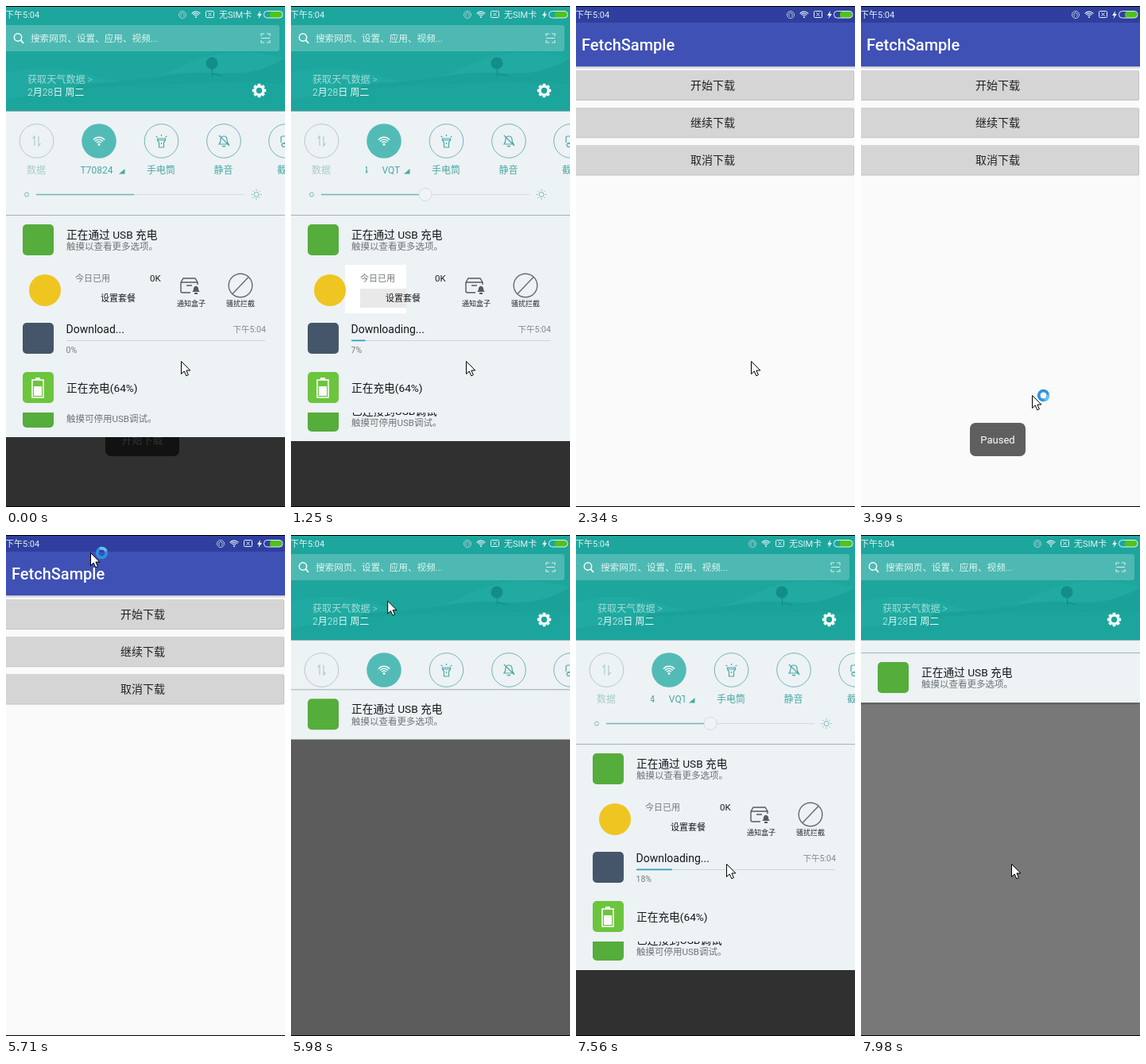
Recreate the animation shown at these times as an HTML page with a canvas. Size 351 by 631 pixels, loop 8 s.

```html
<!DOCTYPE html>
<html lang="zh-CN">
<head>
<meta charset="utf-8">
<title>Download notification</title>
<style>
html, body { margin: 0; width: 100%; height: 100%; overflow: hidden; background: #000; }
canvas { display: block; width: 351px; height: 631px; }
</style>
</head>
<body>
<canvas id="stage"></canvas>
<script>
const W = 351, H = 631, LOOP = 8000, ROW = 62, HEAD = 132, LIST = 264;
const FONT = 'Roboto, "Noto Sans CJK SC", "Noto Sans CJK", sans-serif';
const TEAL = '#4aa9a4', PANEL = '#edf2f5';
const canvas = document.getElementById('stage');
const c = canvas.getContext('2d');
const dpr = window.devicePixelRatio || 1;
canvas.width = W * dpr;
canvas.height = H * dpr;

// Screen refreshes: [first, last, count]
const ticks = [0];
for (const [a, b, n] of [[120, 1130, 8], [1250, 1400, 2], [1530, 1920, 4], [2070, 2200, 2],
  [3210, 3340, 2], [3630, 3990, 4], [4150, 4570, 4], [4690, 5710, 9],
  [5830, 6560, 6], [6720, 6870, 2], [7020, 7980, 8]])
  for (let i = 0; i < n; i++) ticks.push(a + (b - a) * i / (n - 1));

const shadeKeys = [[0, 543], [120, 548], [1400, 548], [1530, 520], [1660, 420], [1790, 300],
  [1920, 188], [2070, 50], [2200, 0], [5710, 0], [5830, 70], [5970, 250], [6110, 420],
  [6260, 530], [6400, 548], [7568, 548], [7706, 490], [7843, 350], [7980, 211]];
const pointerKeys = [[3500, 220, 447], [3990, 215, 490], [4570, 120, 152], [5300, 108, 40],
  [5710, 106, 22], [5830, 106, 22], [6560, 182, 325], [7000, 189, 414]];
const pausedKeys = [[3600, 0], [3850, 1], [5300, 1], [5650, 0]];
const startedKeys = [[400, 1], [700, 0]];

function at(keys, t, col = 1) {
  const i = keys.findIndex(k => k[0] >= t);
  if (i < 0) return keys[keys.length - 1][col];
  if (!i) return keys[0][col];
  const a = keys[i - 1], b = keys[i];
  return a[col] + (b[col] - a[col]) * (t - a[0]) / (b[0] - a[0]);
}

// y is the optical middle of the line
function text(s, x, y, size, color, weight = 400, align = 'left') {
  c.font = `${weight} ${size}px ${FONT}`;
  c.textAlign = align;
  c.fillStyle = color;
  c.fillText(s, x, y + size * 0.37);
}
function rect(x, y, w, h, color, r = 0) {
  c.fillStyle = color;
  c.beginPath();
  c.roundRect(x, y, w, h, r);
  c.fill();
}
function disc(x, y, r, color) {
  c.fillStyle = color;
  c.beginPath();
  c.arc(x, y, r, 0, 7);
  c.fill();
}
function ring(x, y, r, color, width = 1) {
  c.strokeStyle = color;
  c.lineWidth = width;
  c.beginPath();
  c.arc(x, y, r, 0, 7);
  c.stroke();
}
function path(d, color, width = 1, x = 0, y = 0) {
  c.save();
  c.translate(x, y);
  c.strokeStyle = c.fillStyle = color;
  c.lineWidth = width;
  const p = new Path2D(d);
  if (width) c.stroke(p); else c.fill(p);
  c.restore();
}
function wifi(x, y, size, color) {
  for (const r of [0.45, 0.8, 1.15]) {
    c.strokeStyle = color;
    c.lineWidth = size * 0.18;
    c.beginPath();
    c.arc(x, y, r * size, -Math.PI * 0.78, -Math.PI * 0.22);
    c.stroke();
  }
  disc(x, y, size * 0.18, color);
}

function statusBar(sim) {
  const ink = '#e4f1f5', shift = sim ? -48 : 0;
  text('下午5:04', -1, 11, 11, ink);
  ring(270 + shift, 11, 4.5, '#a9cfda');
  path('M-1.5 2.5Q-3.5-2 0-2.5Q3.5-2 1.5 2.5', '#a9cfda', 1, 270 + shift, 11);
  wifi(287 + shift, 14, 6, ink);
  c.strokeStyle = ink;
  c.lineWidth = 1;
  c.beginPath();
  c.roundRect(299.5 + shift, 6.5, 10, 8, 1);
  c.stroke();
  path('M-2-2L2 2M2-2L-2 2', ink, 1, 304.5 + shift, 10.5);
  if (sim) text('无SIM卡', 268, 11, 11, ink);
  path('M320 6L316 12H318.5L317.5 16L322 10H319.5Z', ink, 0);
  rect(332, 7, 15, 8, '#4fc31b', 3);
  c.beginPath();
  c.roundRect(324.5, 6.5, 23.5, 8.5, 4);
  c.stroke();
}

function toast(s, x, w, alpha) {
  if (!alpha) return;
  c.globalAlpha = alpha;
  rect(x, 525, w, 42, '#5f5f5f', 7);
  text(s, x + w / 2, 546, 13, '#fff', 400, 'center');
  c.globalAlpha = 1;
}

function app(t) {
  rect(0, 0, W, H, '#fafafa');
  rect(0, 0, W, 21, '#303f9f');
  rect(0, 21, W, 55, '#3f51b5');
  rect(0, 76, W, 1, '#b9bbc4');
  rect(0, 77, W, 2, '#e3e3e6');
  statusBar(false);
  text('FetchSample', 7, 48.5, 20, '#fff', 500);
  ['开始下载', '继续下载', '取消下载'].forEach((s, i) => {
    const y = 81 + i * 47.3;
    rect(-4, y, 354, 38, '#c3c3c3', 2);
    rect(-4, y, 353, 37, '#d6d5d6', 2);
    text(s, 172, y + 18.5, 14, '#202020', 400, 'center');
  });
  toast('开始下载', 125, 93, at(startedKeys, t));
  toast('Paused', 137, 70, at(pausedKeys, t));
}

function header() {
  rect(0, 0, W, HEAD, '#1da69d');
  path('M0 84Q60 70 110 88T220 76T351 66V132H0Z', '#20aaa1', 0);
  path('M92 98Q150 96 190 89T272 85T351 66V132H60Z', '#1aa198', 0);
  path('M0 118Q120 92 351 97V132H0Z', '#1ca59c', 0);
  disc(259, 72, 7.5, '#128d89');
  path('M259.5 76V89M260 85L272 88', '#128d89', 1.2);
  rect(-3, 24, 347, 33, 'rgba(255,255,255,.21)', 3);
  statusBar(true);
  ring(15, 39.5, 4.7, '#fff', 1.5);
  path('M18.5 43L22 47', '#fff', 1.8);
  text('搜索网页、设置、应用、视频...', 31, 41, 11.6, '#e2f5f3');
  path('M321 38V35H325M328 35H332V38M332 43V46H328M325 46H321V43M321 40.5H332', '#d8f0ee', 1.1);
  text('获取天气数据 >', 27, 93, 12.1, '#a5dcd8', 300);
  text('2月28日 周二', 27, 109, 12.1, '#e8f7f6', 300);
  for (let i = 0; i < 8; i++) {
    c.save();
    c.translate(318.5, 106.5);
    c.rotate(i * Math.PI / 4);
    rect(-2, -8.7, 4, 4, '#f4fcfb', 1);
    c.restore();
  }
  ring(318.5, 106.5, 5.2, '#f4fcfb', 3);
}

function toggles(t) {
  rect(0, HEAD, W, LIST - HEAD, PANEL);
  rect(0, HEAD, W, 1, '#86aeb0');
  ring(38.5, 170, 21.3, '#b9c8ca');
  disc(117, 170, 21.8, '#53bbb6');
  for (const x of [195.5, 274, 352]) ring(x, 170, 21.3, '#74b5b3');
  path('M-2.5 6V-6L-5-3M2.5-6V6L5 3', '#a9cfce', 1.2, 38.5, 170);
  wifi(117, 174.5, 8, '#fff');
  path('M-5-3H5V-1L3 2V8H-3V2L-5-1ZM-5-1H5M0 2V4M-7-6L-5-5M0-8V-6M7-6L5-5', TEAL, 1.2, 195.5, 170);
  path('M-6 4Q-4 2-4-2Q-4-6 0-6Q4-6 4-2Q4 2 6 4ZM-2 6Q0 8 2 6M-6-7L7 6', TEAL, 1.2, 274, 170);
  path('M-6 2V-4Q-6-6-4-6H4M-3 4L4-2M0 5A2.5 2.5 0 1 1-5 5A2.5 2.5 0 1 1 0 5', TEAL, 1.2, 352, 170);
  text('数据', 38, 207, 12, '#a9cbcb', 400, 'center');
  text('手电筒', 195, 207, 12, TEAL, 400, 'center');
  text('静音', 273.5, 207, 12, TEAL, 400, 'center');
  text('截屏', 341, 207, 12, TEAL);

  // Looping network name
  const x = t < 4000 ? 78 - t * 0.03 : 69 - (t - 6560) * 0.03;
  c.save();
  c.beginPath();
  c.rect(94, 196, 43, 22);
  c.clip();
  for (const lap of [0, 74, 148]) text('VQT70824', x + lap, 207, 12, TEAL);
  c.restore();
  path('M142 211.5H149.5V205Z', TEAL, 0);

  rect(38, 237, 262, 1, '#d3dcde');
  rect(38, 236.7, 123, 1.6, '#70b5b3');
  ring(26, 237.5, 2.5, '#7dbab8');
  if (t >= 120) {
    disc(169, 237.5, 8, '#f0f4f6');
    ring(169, 237.5, 8, '#ccd5d7', 0.8);
  }
  ring(315, 237.5, 3, '#7dbab8');
  for (let i = 0; i < 8; i++) {
    const a = i * Math.PI / 4, u = Math.cos(a), v = Math.sin(a);
    path(`M${u * 4.8} ${v * 4.8}L${u * 6.5} ${v * 6.5}`, '#7dbab8', 1, 315, 237.5);
  }
}

const tile = color => rect(21, 11, 39, 39, color, 5);
function message(title, sub) {
  tile('#55ad3b');
  text(title, 76, 24, 13.7, '#161819');
  text(sub, 76, 39, 11.5, '#6f7477');
}
const rows = [
  () => message('正在通过 USB 充电', '触摸以查看更多选项。'),
  t => {
    if (t > 1130 && t < 1400) {
      rect(68, -1, 77, 62, '#fff');
      rect(87, 30, 58, 24, '#e9e9e9');
    }
    disc(49, 32, 20, '#efc522');
    text('今日已用', 87, 17, 11, '#777c80');
    text('0K', 181, 17, 11.5, '#222');
    text('设置套餐', 119, 42, 11, '#17191a', 500);
    path('M-11-4L-8-9H7L10-4M-11-4V7Q-11 9-9 9H1M-11-4H10V-1M-4 0H3', '#555b5f', 1.4, 231, 26);
    path('M3 8Q5 7 5 3Q8-2 11 3Q11 7 13 8ZM6 9H10V11H6Z', '#555b5f', 0, 231, 26);
    ring(295, 26, 14.8, '#666c70', 1.4);
    path('M285 36.5L305 15.5', '#666c70', 1.4);
    text('通知盒子', 233, 49, 9, '#25282a', 400, 'center');
    text('骚扰拦截', 295, 49, 9, '#25282a', 400, 'center');
  },
  t => {
    const pct = Math.floor(Math.min(18, t * 0.0056 + 1e-6));
    tile('#46566a');
    text(t < 120 ? 'Download...' : 'Downloading...', 75.5, 19, 14, '#161819');
    text('下午5:04', 327, 19, 10.6, '#85898c', 400, 'right');
    rect(76, 33, 250, 1, '#cdd5d8');
    rect(76, 32.5, 2.5 * pct, 1.7, '#2f9dc4');
    text(pct + '%', 75.5, 45, 10.5, '#777c80');
  },
  () => {
    tile('#6cc53d');
    rect(37, 18, 6, 3, '#fff');
    c.strokeStyle = '#fff';
    c.lineWidth = 1.6;
    c.strokeRect(33, 21, 14, 22);
    rect(35, 29, 10, 12, '#fff');
    text('正在充电(64%)', 76, 31, 13.7, '#161819');
  },
  () => message('已连接到USB调试', '触摸可停用USB调试。')
];

function shade(t, h) {
  if (h <= 0) return;
  rect(0, 0, W, H, `rgba(0,0,0,${Math.min(0.807, h * 0.00245)})`);
  c.save();
  c.beginPath();
  c.rect(0, 0, W, h);
  c.clip();
  c.save();
  c.translate(0, Math.min(0, h - ROW - HEAD + 1));
  header();
  toggles(t);
  c.restore();
  // Lower rows slide underneath the ones above
  for (let i = rows.length - 1; i >= 0; i--) {
    c.save();
    c.translate(0, Math.min(LIST + i * ROW, h - ROW));
    rect(0, 0, W, ROW, PANEL);
    const left = [0, 325, 148, 76, 187][i];
    rect(left, -1, W - left, 1, i ? '#d5dbde' : '#a7b1b4');
    rows[i](t);
    c.restore();
  }
  c.restore();
}

function pointer(t) {
  const x = at(pointerKeys, t), y = at(pointerKeys, t, 2);
  const d = 'M.5.5V16.5L4.2 13L6.8 18.8L9.4 17.6L6.9 12H11.8Z';
  path(d, '#fff', 0, x, y);
  path(d, '#000', 1, x, y);
  if (t > 3200 && t < 5830) {
    ring(x + 14.5, y + 0.5, 5.8, '#2b93e0', 3.8);
    c.strokeStyle = '#62c1f5';
    c.beginPath();
    c.arc(x + 14.5, y + 0.5, 5.8, t / 160, t / 160 + 1.6);
    c.stroke();
  }
}

function draw(now) {
  const time = now % LOOP;
  const t = ticks.filter(v => v <= time + 5).pop();
  c.setTransform(dpr, 0, 0, dpr, 0, 0);
  app(t);
  shade(t, at(shadeKeys, t));
  rect(0, 0, W, 1, '#000');
  rect(0, H - 1, W, 1, '#000');
  pointer(t);
}

const start = performance.now();
function loop() {
  draw(performance.now() - start);
  requestAnimationFrame(loop);
}
loop();
</script>
</body>
</html>
```
